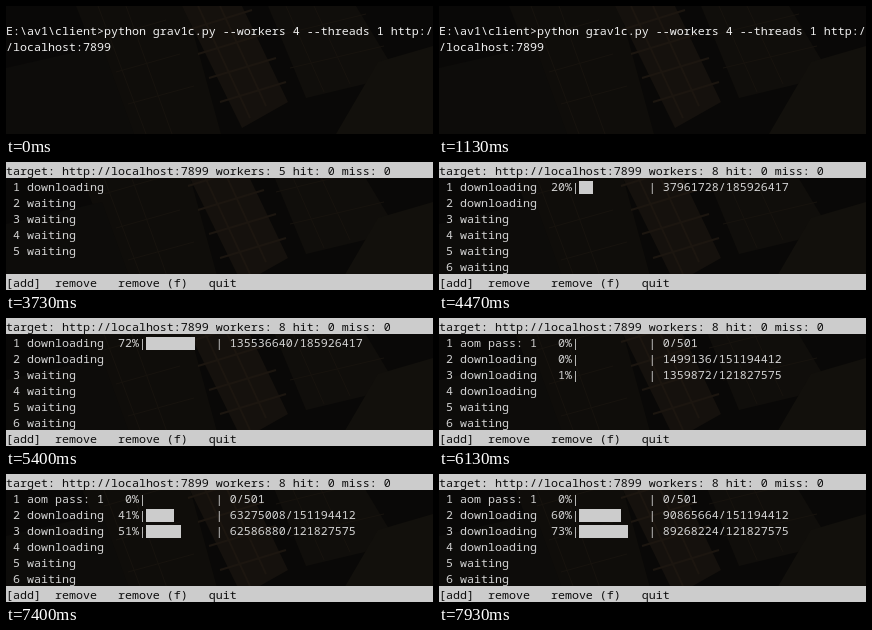
Animation, 427 px wide and 128 px high, one loop 8 s. Source, as an HTML page:

```html
<!DOCTYPE html>
<html lang="en">
<head>
<meta charset="utf-8">
<title>Encoding workers</title>
<style>
  html, body { margin: 0; width: 100%; height: 100%; overflow: hidden; background: #090807; }
  svg { display: block; }
  text { font: 11.667px "Noto Sans Mono", monospace; white-space: pre; fill: #d4d4d4; }
  #shell text { fill: #f2f2f2; }
  #bars text { fill: #0c0c0c; }
  .bar { fill: #ccc; }
</style>
</head>
<body>
<svg id="stage" width="427" height="128" viewBox="0 0 427 128">
  <rect width="427" height="128" fill="#090807"/>
  <g id="backdrop">
    <path fill="#0f0d0a" d="M70 0H180L215 128H120Z"/>
    <path fill="#15110d" d="M176 0H236L282 96L236 122Z"/>
    <path fill="#100e0b" d="M262 0H350L392 70L300 92Z"/>
    <path fill="#0d0c0a" d="M0 62L96 40L128 128H0Z"/>
    <path fill="#12100c" d="M330 128L372 56L427 40V128Z"/>
    <path fill="none" stroke="#1c1610" stroke-width="2" d="M192 0L244 112M214 0L260 100M182 24L246 4M192 48L258 28M203 72L270 52M214 96L280 76"/>
    <path fill="none" stroke="#17130e" d="M92 0L140 128M120 0L166 128M98 32L160 14M110 66L174 48M122 98L188 80M280 0L318 86M308 0L344 78M270 30L360 8M284 62L378 40"/>
  </g>
  <g id="shell">
    <text y="29">E:\av1\client&gt;python grav1c.py --workers 4 --threads 1 http:/</text>
    <text y="45">/localhost:7899</text>
    <rect id="cursor" width="7" height="4" fill="#f2f2f2"/>
  </g>
  <g id="monitor">
    <g id="rows"></g>
    <g id="bars">
      <rect class="bar" width="427" height="16"/>
      <rect class="bar" y="112" width="427" height="16"/>
      <text id="header" y="13"></text>
      <text y="125">[add]  remove   remove (f)   quit</text>
    </g>
  </g>
</svg>
<script>
const LOOP = 8000, TICKS_PER_SECOND = 15;
const CELL = 7, LINE = 16, BASELINE = 13, CHUNK = 8192;
const $ = id => document.getElementById(id);

function add(parent, tag, attrs) {
  const node = document.createElementNS("http://www.w3.org/2000/svg", tag);
  for (const name in attrs) node.setAttribute(name, attrs[name]);
  return parent.appendChild(node);
}

const rows = Array.from({ length: 6 }, (_, i) => {
  const y = (i + 1) * LINE;
  return {
    block: add($("rows"), "rect", { class: "bar", x: 20 * CELL, y: y + 3, height: 13 }),
    text: add($("rows"), "text", { y: y + BASELINE })
  };
});

// Each download: total bytes and [tick, bytes] points joined by straight lines.
const downloads = [
  { total: 185926417, points: [[67, 37961728], [81, 135536640]] },
  { total: 151194412, points: [[92, 1499136], [104, 39133184], [119, 90865664]] },
  { total: 121827575, points: [[92, 1359872], [104, 39247872], [119, 89268224]] }
];

function received({ total, points }, tick) {
  const i = points.length > 2 && tick > points[1][0] ? 1 : 0;
  const [t0, v0] = points[i], [t1, v1] = points[i + 1];
  const value = v0 + (v1 - v0) * (tick - t0) / (t1 - t0);
  return Math.min(total, Math.max(0, Math.round(value / CHUNK) * CHUNK));
}

const progress = (label, value, total) => ({ label, value, total });
const download = (index, tick) =>
  progress("downloading", received(downloads[index], tick), downloads[index].total);

function workerStates(tick, count) {
  const downloading = { label: "downloading" };
  let active = [downloading];
  if (tick >= 92) {
    active = [progress("aom pass: 1", 0, 501), download(1, tick), download(2, tick), downloading];
  } else if (tick >= 61) {
    active = [download(0, tick), downloading];
  }
  return rows.map((_, i) => i < count ? active[i] || { label: "waiting" } : null);
}

function drawRow(row, state, number) {
  let line = "", filled = 0;
  if (state) {
    line = ` ${number} ${state.label}`;
    if (state.total) {
      const share = state.value / state.total;
      const percent = `${Math.floor(share * 100)}%`.padStart(5);
      filled = Math.floor(share * 10);
      line += `${percent}|${" ".repeat(10)}| ${state.value}/${state.total}`;
    }
  }
  row.text.textContent = line;
  row.block.setAttribute("width", filled * CELL);
}

function drawShell(tick) {
  const entered = tick >= 30;
  const lit = (tick >= 10 && tick < 17) || tick >= 25;
  $("cursor").setAttribute("x", entered ? 0 : 15 * CELL);
  $("cursor").setAttribute("y", entered ? 60 : 44);
  $("cursor").setAttribute("visibility", lit ? "inherit" : "hidden");
}

function drawMonitor(tick) {
  const count = 4 + [54, 57, 59, 61].filter(start => tick >= start).length;
  $("header").textContent = `target: http://localhost:7899 workers: ${count} hit: 0 miss: 0`;
  workerStates(tick, count).forEach((state, i) => drawRow(rows[i], state, i + 1));
}

let lastTick = -1;
function frame() {
  const time = performance.now() % LOOP;
  const tick = Math.min(119, Math.floor((time + 4) * TICKS_PER_SECOND / 1000));
  if (tick !== lastTick) {
    lastTick = tick;
    const running = tick >= 32;
    $("shell").setAttribute("visibility", running ? "hidden" : "visible");
    $("monitor").setAttribute("visibility", running ? "visible" : "hidden");
    if (running) drawMonitor(tick);
    else drawShell(tick);
  }
  requestAnimationFrame(frame);
}
frame();
</script>
</body>
</html>
```
